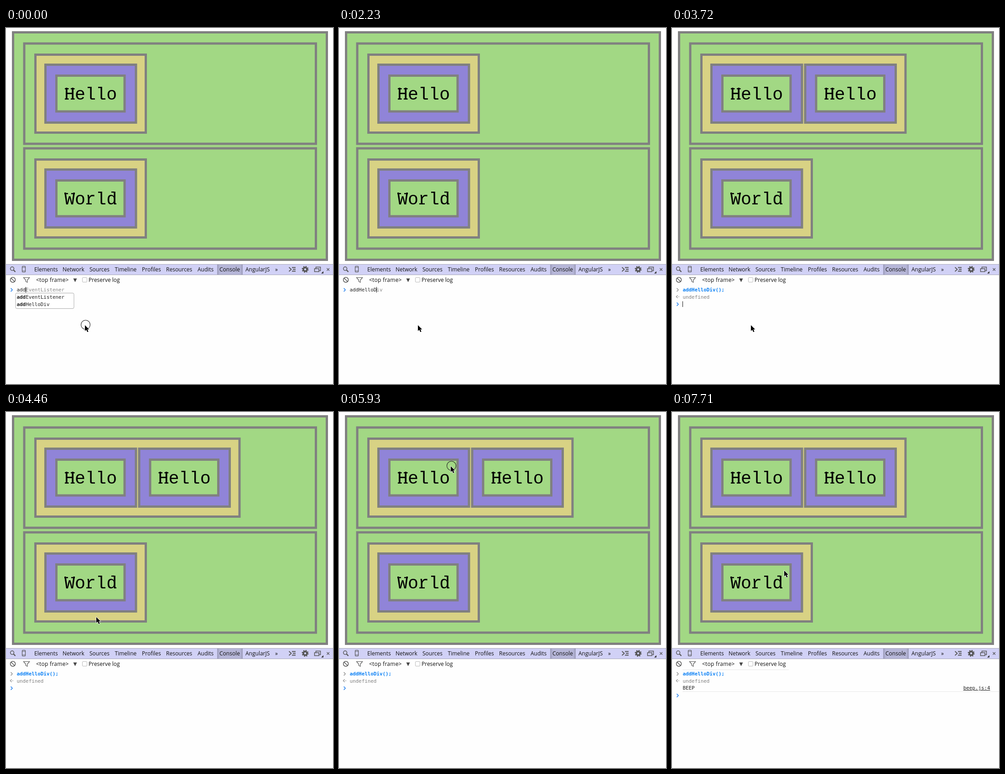
Write an HTML page that moves like this. It is 717 by 781 pixels and loops after 8000 ms.

```html
<!DOCTYPE html>
<html lang="en">
<head>
<meta charset="utf-8">
<title>Console demo</title>
<style>
  html, body { margin: 0; width: 100%; height: 100%; overflow: hidden; background: #fefefe; }
  svg { display: block; }
  text { white-space: pre; }
  .box { stroke: #808080; stroke-width: 5; }
  .green { fill: #a2d884; }
  .yellow { fill: #d8d284; }
  .purple { fill: #9084d8; }
  .word { font: 38.4px "Liberation Mono", "Courier New", monospace; }
  .serif { stroke: #000; stroke-width: 2.6; }
  .ui { font: 12px "Open Sans", "Noto Sans", sans-serif; fill: #111; }
  .code { font: 10.87px "DejaVu Sans Mono", monospace; fill: #222; }
  .bold { font-weight: bold; }
  .line { fill: none; stroke: #555; stroke-width: 1.5; }
  .ghost { fill: #888; }
  .chev { fill: none; stroke: #2f87f0; stroke-width: 1.6; }
  .old { stroke: #999; }
</style>
</head>
<body>
<svg width="717" height="781" viewBox="0 0 717 781">
  <defs>
    <linearGradient id="tab">
      <stop offset="0" stop-color="#9a9ab8"/>
      <stop offset=".1" stop-color="#b6b6d8"/>
      <stop offset=".9" stop-color="#b6b6d8"/>
      <stop offset="1" stop-color="#9a9ab8"/>
    </linearGradient>
    <path id="chev" d="M10.5 -3.6L14 0L10.5 3.6"/>
    <g id="cell">
      <rect class="box purple" x="86.5" y="80.5" width="198.5" height="127"/>
      <rect class="box green" x="110.5" y="104.5" width="149.5" height="78.5"/>
    </g>
    <g id="hello">
      <use href="#cell"/>
      <text class="word" x="128" y="157">Hello</text>
      <path class="serif" d="M129 133.2h8.5M142 133.2h8.500M129 155.700h8.500M142 155.700h8.500"/>
    </g>
  </defs>

  <rect class="box green" x="15.500" y="9.500" width="688" height="499"/>
  <rect class="box green" x="40" y="34" width="639.500" height="220"/>
  <rect class="box green" x="40" y="264" width="639.500" height="220"/>
  <rect id="group" class="box yellow" x="64.500" y="58.500" width="242" height="171"/>
  <use href="#hello"/>
  <use id="second" href="#hello" x="205.500"/>
  <rect class="box yellow" x="64.500" y="288.500" width="242" height="171"/>
  <use href="#cell" y="230"/>
  <text class="word" x="128" y="387">World</text>
  <path class="serif" d="M128 363.200h8M143 363.200h8M176 385.700h12M231 360h6M237 385.700h5"/>

  <!-- tool bar -->
  <rect y="518" width="717" height="23" fill="#d1d1f6"/>
  <path d="M0 518.500H717M0 541.500H717" stroke="#a9a9b8"/>
  <rect x="463" y="519" width="56" height="22" fill="url(#tab)"/>
  <g id="tabs" class="ui"></g>
  <g class="line">
    <circle cx="13.500" cy="528" r="3.900"/>
    <path d="M16.500 531L20.500 535" stroke-width="2.400"/>
    <rect x="35.500" y="522.500" width="7" height="13" rx="1.500" stroke-width="1.200"/>
    <path d="M36 525h6M36 533h6" stroke-width="1"/>
    <path d="M620.500 525l5 4.500l-5 4.500M627 525.500h8M629 529.500h6M627 533.500h8" stroke-width="1.800"/>
    <circle cx="656" cy="529.500" r="4" stroke-width="3.500"/>
    <circle cx="656" cy="529.500" r="6.300" stroke-width="2.400" stroke-dasharray="2.474"/>
    <path d="M679.500 531V524.500H689.500V532.500H687"/>
    <rect x="676.500" y="528" width="9.500" height="6.500" fill="#d1d1f6"/>
    <path d="M703.500 527l5.500 5.500M709 527l-5.500 5.500" stroke-width="1.200"/>
    <circle cx="15" cy="552.500" r="5.500"/>
    <path d="M11 548.500l8 8"/>
    <path d="M38.500 547.500H51.500L46.800 553V558L43.200 556V553Z" stroke-width="1.200"/>
  </g>
  <path d="M696 533.500v5h-5z" fill="#333"/>
  <text class="ui" x="66" y="556.500" letter-spacing=".25">&lt;top frame&gt;</text>
  <path d="M147.500 549.500h8l-4 8z" fill="#444"/>
  <rect x="167.500" y="547.500" width="10" height="10" rx="1.500" fill="#fff" stroke="#bbb"/>
  <text class="ui" x="181" y="557">Preserve log</text>

  <!-- console -->
  <g id="typing">
    <use class="chev" href="#chev" y="574.500"/>
    <text class="code" x="23.500" y="577.700"><tspan id="typed"></tspan><tspan id="ghost" class="ghost"></tspan></text>
  </g>
  <g id="popup">
    <rect x="21" y="581.500" width="128" height="34" rx="3" fill="#fff" stroke="#aaa"/>
    <text class="code" x="23.500" y="593.500"><tspan class="bold">add</tspan>EventListener</text>
    <text class="code" x="23.500" y="610"><tspan class="bold">add</tspan>HelloDiv</text>
  </g>
  <g id="done">
    <use class="chev old" href="#chev" y="574.500"/>
    <text class="code bold" x="23.500" y="577.700" style="fill:#0b80f5">addHelloDiv();</text>
    <path class="chev old" d="M12.500 586.500l-3 3l3 3" stroke-width="1.300"/>
    <circle cx="14.800" cy="589.500" r=".9" fill="#999"/>
    <text class="code" x="23.500" y="593.500" style="fill:#808080">undefined</text>
    <use id="prompt" class="chev" href="#chev"/>
  </g>
  <g id="beep">
    <path d="M23 565.500H256M23 613.500H717" stroke="#e8e8e8"/>
    <text class="code" x="23.500" y="609">BEEP</text>
    <text class="code" x="638.700" y="609" text-decoration="underline">beep.js:4</text>
  </g>
  <path id="caret" d="M.5 -6V6.500" stroke="#111"/>

  <g id="mouse">
    <circle id="ring" cx="1.500" cy="-1" r="10" fill="none" stroke="#222" stroke-width="1.100"/>
    <path d="M0 0V12.800L3 10L5.300 15L7.700 14L5.400 9.200H9.300Z" stroke="#fff" stroke-width="1.600" paint-order="stroke" stroke-linejoin="round"/>
  </g>
</svg>
<script>
  const $ = id => document.getElementById(id);
  const LOOP = 8000, RUN = 3720, LOG = 5940, ADV = 6.54;

  const tabs = { Elements: 62, Network: 124, Sources: 183, Timeline: 238.5, Profiles: 298,
    Resources: 351, Audits: 420, Console: 468, AngularJS: 525, '»': 590 };
  for (const [name, x] of Object.entries(tabs)) {
    const el = document.createElementNS('http://www.w3.org/2000/svg', 'text');
    el.setAttribute('x', x);
    el.setAttribute('y', 533.5);
    el.textContent = name;
    $('tabs').append(el);
  }

  // time, typed text, completion hint
  const keys = [
    [0, 'add', 'EventListener'], [450, 'addH', ''], [590, 'addH', 'elloDiv'],
    [1190, 'addHe', ''], [1490, 'addHel', ''], [1790, 'addHell', ''],
    [1930, 'addHello', 'Div'], [2230, 'addHelloD', 'iv'], [2530, 'addHelloDi', 'v'],
    [2680, 'addHelloDiv', ''], [2970, 'addHelloDiv()', ''], [3270, 'addHelloDiv();', '']
  ];

  // time, x, y
  const moves = [
    [0, 173, 652], [4170, 175, 642], [4320, 184, 570], [4460, 198, 450], [4610, 214, 310],
    [4750, 229, 195], [4900, 239, 125], [5050, 244, 101], [5190, 245, 119],
    [6970, 248, 170], [7120, 252, 225], [7270, 253, 280], [7410, 251, 318],
    [7560, 248, 340], [7710, 246, 348]
  ];

  const at = (list, t) => list.findLast(step => step[0] <= t);
  const within = (t, a, b) => t >= a && t < b;
  const show = (id, on) => $(id).style.display = on ? '' : 'none';
  const place = (id, x, y) => $(id).setAttribute('transform', `translate(${x} ${y})`);

  function draw(t) {
    const [, typed, ghost] = at(keys, t);
    const [, x, y] = at(moves, t);
    const ran = t >= RUN, logged = t >= LOG;

    $('typed').textContent = typed;
    $('ghost').textContent = ghost;
    show('typing', !ran);
    show('popup', t < 450);
    show('done', ran);
    show('second', ran);
    show('beep', logged);
    $('group').setAttribute('width', ran ? 447.5 : 242);
    place('prompt', 0, logged ? 622 : 606);

    show('caret', t < 4170 || within(t, 4750, 5190));
    if (ran) place('caret', 23, 605.5);
    else place('caret', Math.round(23 + ADV * typed.length), 574);

    place('mouse', x, y);
    show('ring', t < 150 || within(t, 5790, 6080));
  }

  const start = performance.now();
  function tick() {
    draw((performance.now() - start) % LOOP);
    requestAnimationFrame(tick);
  }
  tick();
</script>
</body>
</html>
```
